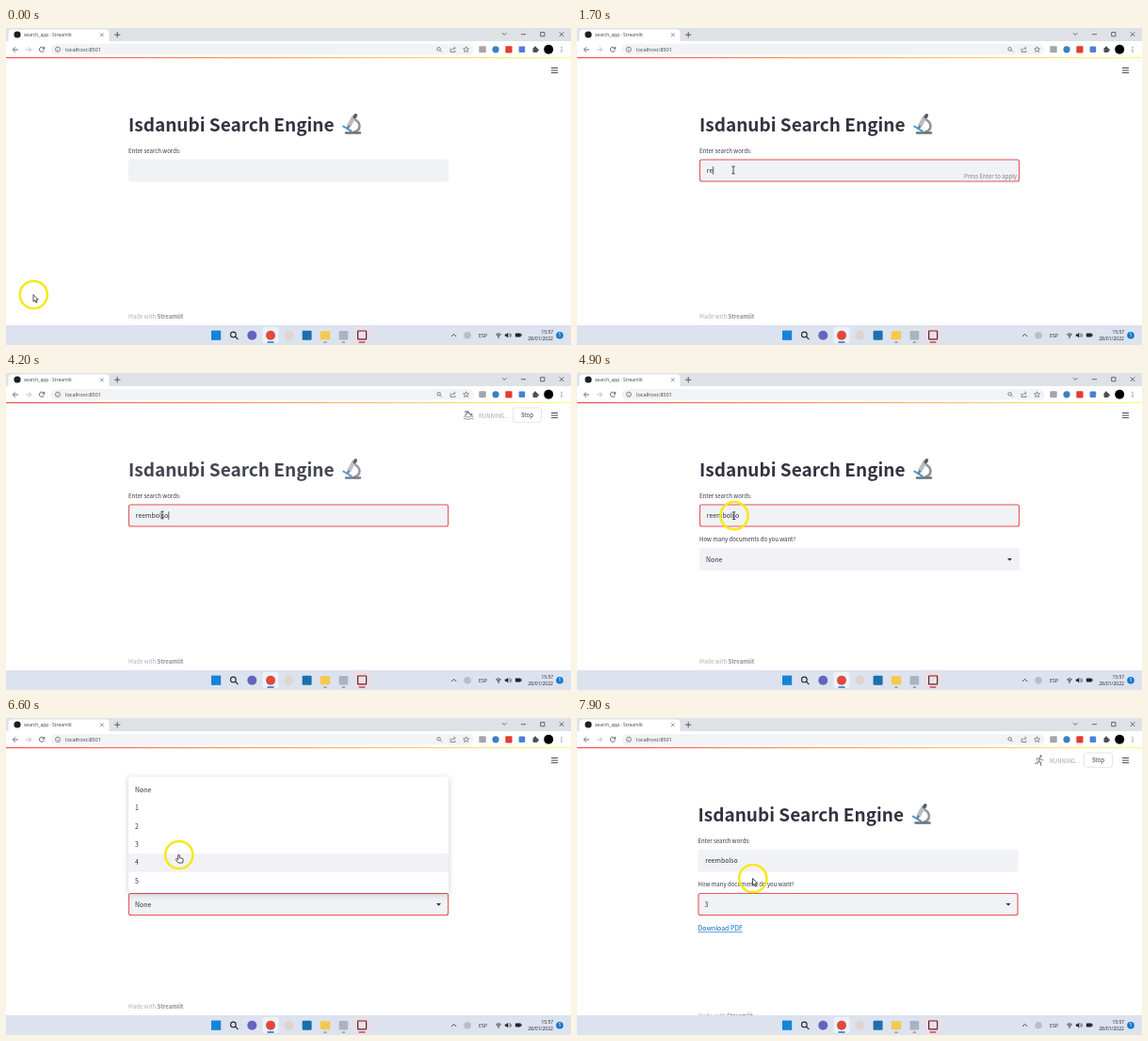
An HTML page with a canvas for the animation above (8 s loop, 600 px wide and 337 px high).

```html
<!DOCTYPE html>
<html lang="en">
<head>
<meta charset="utf-8">
<title>search_app</title>
<style>
html, body { margin: 0; width: 100%; height: 100%; overflow: hidden; background: #fff; }
canvas { display: block; width: 600px; height: 337px; }
</style>
</head>
<body>
<canvas id="stage"></canvas>
<script>
const W = 600, H = 337, LOOP = 8000;
const canvas = document.getElementById('stage');
const c = canvas.getContext('2d');
const dpr = window.devicePixelRatio || 1;
canvas.width = W * dpr;
canvas.height = H * dpr;

const PAGE_FONT = '"Noto Sans CJK JP", "Noto Sans CJK SC", "Noto Sans CJK", sans-serif';
const UI_FONT = '"Open Sans", "Noto Sans", sans-serif';
const INK = '#31333f', RED = '#ec5555', FIELD = '#f0f2f6';
const SMALL = 6.05, BODY = 6.92;

const WORD = 'reembolso';
const KEYS = [1400, 1600, 1900, 2000, 2200, 2400, 2600, 2800, 3000];
const FOCUS = 900, ENTER = 3400, SELECT_IN = 4500;
const OPEN = 5800, PICK = 7000, LINK_IN = 7500;
const ROW_TOP = 66.6, ROW_H = 19.4;

// time, x, y of the pointer tip
const PATH = [
  [0, 29, 283.5], [150, 29, 283.5], [900, 166, 151], [4850, 166, 151],
  [5450, 198.5, 184.5], [5550, 198.5, 184.5], [5750, 197, 198], [6000, 197, 198],
  [6550, 183.5, 145.5], [6650, 183.5, 145.5], [6880, 184, 135], [7050, 184, 135],
  [7700, 186.5, 170.5], [8000, 186.5, 170.5]
];

const clamp = v => Math.max(0, Math.min(1, v));
const ramp = (t, a, b) => clamp((t - a) / (b - a));

function pointer(t) {
  let i = 1;
  while (i < PATH.length - 1 && PATH[i][0] < t) i++;
  const a = PATH[i - 1], b = PATH[i];
  const u = ramp(t, a[0], b[0]), e = u * u * (3 - 2 * u);
  return { x: a[1] + (b[1] - a[1]) * e, y: a[2] + (b[2] - a[2]) * e };
}

function text(str, x, y, size, color = INK, opt = {}) {
  c.font = `${opt.bold ? 'bold ' : ''}${size}px ${opt.font || PAGE_FONT}`;
  c.textAlign = opt.align || 'left';
  c.fillStyle = color;
  c.fillText(str, x, y);
  return c.measureText(str).width;
}

function rect(x, y, w, h, color) {
  c.fillStyle = color;
  c.fillRect(x, y, w, h);
}

function round(x, y, w, h, r, fill, stroke, lw = 1) {
  c.beginPath();
  c.roundRect(x, y, w, h, r);
  if (fill) { c.fillStyle = fill; c.fill(); }
  if (stroke) { c.strokeStyle = stroke; c.lineWidth = lw; c.stroke(); }
}

function disc(x, y, r, fill) {
  c.beginPath();
  c.arc(x, y, r, 0, 7);
  c.fillStyle = fill;
  c.fill();
}

function ring(x, y, r, color, lw, from = 0, to = Math.PI * 2) {
  c.beginPath();
  c.arc(x, y, r, from, to);
  c.strokeStyle = color;
  c.lineWidth = lw;
  c.stroke();
}

// polylines given as an SVG path
function line(d, color, lw = 0.8) {
  c.strokeStyle = color;
  c.lineWidth = lw;
  c.stroke(new Path2D(d));
}

function shape(d, color) {
  c.fillStyle = color;
  c.fill(new Path2D(d));
}

function magnifier(x, y, s, color, lw) {
  ring(x - s * 0.15, y - s * 0.15, s * 0.65, color, lw);
  line(`M${x + s * 0.3} ${y + s * 0.3}L${x + s} ${y + s}`, color, lw);
}

function drawBrowser() {
  const ico = '#5f6368';
  rect(0, 0, W, 14, '#dee1e6');
  round(2.5, 1.5, 107, 14, [4, 4, 0, 0], '#fff');
  rect(0, 14, W, 17, '#fff');
  disc(12, 7, 3.6, '#1d1d24');
  text('search_app · Streamlit', 19, 9, 4.94, '#3c4043', { font: UI_FONT });
  line('M100 5.5l3.6 3.6m0 -3.6l-3.6 3.6', ico, 0.7);
  line('M115 7.2h6.4m-3.2 -3.2v6.4', '#3c4043', 0.8);
  line('M527 5.2l2.2 2.2l2.2 -2.2', '#333', 0.7);
  line('M547 6.7h5', '#333', 0.7);
  line('M567.7 4.6h4.2v4.2h-4.2z', '#333', 0.7);
  line('M587.7 4.4l4.6 4.6m0 -4.6l-4.6 4.6', '#333', 0.7);

  line('M13 23h-5.6m2.6 -2.7l-2.7 2.7l2.7 2.7', ico, 0.9);
  line('M21 23h5.6m-2.6 -2.7l2.7 2.7l-2.7 2.7', '#b5b8bc', 0.9);
  ring(38, 22.8, 2.6, ico, 0.9, 0.3, 5.4);
  shape('M41.2 19.6v3h-3z', ico);
  round(47.5, 17, 449, 11.6, 5.8, '#f1f3f4');
  ring(55, 22.8, 2.6, ico, 0.7);
  line('M55 22.4v1.8m0 -3v-.7', ico, 0.7);
  text('localhost:8501', 63, 24.9, 5.65, '#3c4043', { font: UI_FONT });
  magnifier(460, 22.7, 2.7, ico, 0.8);
  line('M472 21.5v4h5v-1.5m-3.5 -.3q.3 -2.2 3 -2.3m-1 -1.6l1.7 1.6l-1.7 1.6', ico, 0.7);
  c.beginPath();
  for (let i = 0; i < 10; i++) {
    const a = -Math.PI / 2 + i * Math.PI / 5, r = i % 2 ? 1.4 : 3.2;
    c.lineTo(488.6 + r * Math.cos(a), 23 + r * Math.sin(a));
  }
  c.closePath();
  c.strokeStyle = ico;
  c.lineWidth = 0.7;
  c.stroke();
  round(502.3, 19.3, 7.4, 7, 1, '#a3a5aa');
  disc(520, 22.8, 3.6, '#3b7fc4');
  round(530.3, 19.2, 7.2, 7.2, 1, '#e53b30');
  round(544.6, 19.5, 6.6, 6.6, 1, '#4a80d6');
  round(559.5, 21, 5, 5, 0.8, '#4c4f54');
  disc(562, 20.7, 1.2, '#4c4f54');
  disc(564.7, 23.4, 1.2, '#4c4f54');
  disc(576.2, 22.8, 5, '#000');
  for (let i = -1; i < 2; i++) disc(590, 22.8 + i * 2.2, 0.65, ico);
}

function drawTaskbar() {
  rect(0, 316, W, 21, '#dce3ee');
  round(272.5, 318, 17, 17, 2, '#edf1f8');
  round(369.5, 318, 17, 17, 2, '#f1dce2');
  rect(218, 321.6, 10.2, 10.2, '#1583d8');
  magnifier(242, 326.6, 4.4, '#25282e', 1.1);
  disc(261.3, 326.7, 5, '#6264c0');
  disc(281, 326.7, 5, '#e2483c');
  disc(300.2, 326.7, 5, '#ded4d0');
  round(314.6, 321.8, 10, 10, 1.2, '#1b6fae');
  round(333.8, 322.2, 10.4, 9, 1, '#f4c94c');
  round(353.6, 322, 9.6, 9.6, 1.2, '#aab3bf');
  round(373.6, 322, 9, 8.8, 0.4, null, '#4b2a35', 1.2);
  round(277.3, 333.3, 7.4, 1.4, 0.7, '#1a73c4');
  round(337.2, 333.5, 3.6, 1.2, 0.6, '#85898f');
  round(356.6, 333.5, 3.6, 1.2, 0.6, '#85898f');
  round(374.5, 333.3, 7, 1.4, 0.7, '#d2434d');

  const ink = '#22252a', ui = { font: UI_FONT };
  line('M473 328l2.6 -2.6l2.6 2.6', ink, 0.8);
  disc(490, 326.7, 3.8, '#b9bec6');
  text('ESP', 502, 328.8, 5.2, ink, ui);
  for (let r = 1.6; r < 5; r += 1.4) ring(523, 329.2, r, ink, 0.7, -2.3, -0.84);
  disc(523, 329, 0.7, ink);
  shape('M529.8 325.6h1.5l2 -1.8v5.8l-2 -1.8h-1.5z', ink);
  ring(533.4, 326.7, 1.7, ink, 0.6, -0.9, 0.9);
  ring(533.4, 326.7, 3, ink, 0.6, -0.9, 0.9);
  round(540.8, 324.6, 6, 3.8, 0.8, ink);
  rect(547, 325.7, 0.8, 1.6, ink);
  text('15:57', 581, 325, 4.9, ink, { font: UI_FONT, align: 'right' });
  text('28/01/2022', 581, 332.4, 5.05, ink, { font: UI_FONT, align: 'right' });
  disc(588, 326.7, 3.8, '#1277c9');
  text('5', 588, 328.4, 4.4, '#fff', { font: UI_FONT, align: 'center' });
}

function drawMicroscope(x) {
  c.save();
  c.translate(x, 0);
  c.lineCap = 'round';
  line('M241 97.5q6 4 4 9q-1 3 -5 4', '#8e949b', 2.6);
  line('M231 111.5h15', '#6a7078', 2.4);
  line('M228.3 104.5l8.4 5.2', '#3f94dc', 2);
  line('M239 95l-4.6 8.6', '#b7bcc2', 4.4);
  line('M241.3 92.8l-1 1.9', '#555b63', 3.6);
  line('M233.9 104.6l-.9 1.6', '#7a8088', 2.4);
  c.restore();
}

function drawSport(swim) {
  const g = '#85868d';
  c.lineCap = c.lineJoin = 'round';
  if (swim) {
    disc(494.2, 44.2, 1.3, g);
    line('M487.5 41.2l3.2 -.2l2 2.6m-2.2 -2.2l-2.6 3.2', g, 1.3);
    line('M486.4 46.4q1.6 -1.2 3.2 0t3.2 0t3.4 0M486.4 48.8q1.6 -1.2 3.2 0t3.2 0t3.4 0', g, 0.9);
  } else {
    disc(492.6, 40.6, 1.3, g);
    line('M491.6 42.8l-1.4 3.2l2.4 1.4l-.2 2.9m-2.4 -3.8l-1 1.6l-2.4 .1', g, 1.3);
    line('M488 45l.5 -2.1l3 -.3l1.5 1.9l2 .2', g, 1);
  }
  c.lineCap = 'butt';
  c.lineJoin = 'miter';
}

function drawStatus(t) {
  const first = ramp(t, 3450, 3800) * (1 - ramp(t, SELECT_IN, SELECT_IN + 150));
  const second = ramp(t, 7150, 7450);
  const alpha = Math.max(first, second);
  if (!alpha) return;
  const step = Math.floor((t - (second ? 7100 : 3500)) / 300);
  c.globalAlpha = alpha;
  drawSport((step % 2 === 0) !== (second > 0));
  text('RUNNING...', 502, 47.7, SMALL, 'rgba(49,51,63,.45)');
  round(538.5, 37, 30, 15.3, 2, '#fff', '#dcdce0', 0.7);
  text('Stop', 553.4, 47, SMALL, INK, { align: 'center' });
  c.globalAlpha = 1;
}

function drawField(x, y, focused) {
  round(x, y, 340, 24, 2, FIELD);
  if (focused) round(x + 0.5, y + 0.5, 339, 23, 2, null, RED, 1.1);
}

function drawInput(x, t) {
  const focused = t >= FOCUS && t < OPEN;
  const typed = KEYS.filter(k => t >= k).length;
  drawField(x, 139.5, focused);
  const w = text(WORD.slice(0, typed), x + 7.8, 154, BODY);
  if (!focused) return;
  const last = typed ? KEYS[typed - 1] : FOCUS;
  if ((t - last) % 1060 < 530) rect(x + 8 + w, 147.2, 0.7, 8.6, '#222');
  if (typed && t < ENTER) {
    text('Press Enter to apply', x + 337, 160, SMALL, 'rgba(49,51,63,.6)', { align: 'right' });
  }
}

function drawSelect(x, t) {
  const alpha = ramp(t, SELECT_IN, SELECT_IN + 150);
  if (!alpha) return;
  c.globalAlpha = alpha;
  text('How many documents do you want?', x, 179, SMALL);
  drawField(x, 186, t >= OPEN);
  text(t >= PICK ? '3' : 'None', x + 7, 200.5, BODY);
  const ax = x + 327;
  shape(`M${ax} 197h5l-2.5 2.8z`, INK);
  c.globalAlpha = 1;
}

function drawMenu(p) {
  c.save();
  c.shadowColor = 'rgba(0,0,0,.2)';
  c.shadowBlur = 6 * dpr;
  c.shadowOffsetY = 1.5 * dpr;
  round(130, 62.5, 340, 123.5, 2, '#fff');
  c.restore();
  const row = Math.floor((p.y - ROW_TOP) / ROW_H);
  const hot = row >= 0 && row < 6 ? row : 0;
  rect(130, ROW_TOP + hot * ROW_H, 340, ROW_H, FIELD);
  ['None', '1', '2', '3', '4', '5'].forEach((s, i) =>
    text(s, 137, ROW_TOP + i * ROW_H + 12.2, BODY));
}

function drawPage(t, p) {
  const moved = t >= LINK_IN;
  const x = moved ? 128.5 : 130;
  rect(0, 31, W, 285, '#fff');
  const g = c.createLinearGradient(0, 0, W, 0);
  g.addColorStop(0, '#ff4b4b');
  g.addColorStop(1, '#fffd80');
  rect(0, 31, W, 1.2, g);
  for (let i = 0; i < 3; i++) rect(579, 42 + i * 2.6, 7, 0.9, INK);
  drawStatus(t);

  // content dims slowly while the script is running
  const late = t < SELECT_IN ? ramp(t, 3900, 4900) : 0;
  c.globalAlpha = 1 - 0.67 * Math.pow(late, 1.7);
  text('Isdanubi Search Engine', x, 109.6, 19.03, INK, { bold: true });
  drawMicroscope(x);
  c.globalAlpha = 1;
  text('Enter search words:', x, 132.6, SMALL);
  drawInput(x, t);
  drawSelect(x, t);
  if (moved) {
    const w = text('Download PDF', x, 226.3, BODY, '#0068c9');
    rect(x, 227.2, w, 0.6, '#0068c9');
  }
  const footY = moved ? 318.7 : 309;
  const w = text('Made with ', x, footY, SMALL, 'rgba(49,51,63,.4)');
  text('Streamlit', x + w, footY, SMALL, 'rgba(49,51,63,.55)', { bold: true });
  if (t >= OPEN && t < PICK) drawMenu(p);
}

function drawPointer(t, p) {
  const { x, y } = p;
  const beam = t < 5500 && y > 139 && y < 164;
  const hand = t >= 5750 && t < 7250;
  if (t < 950 || t > 4850) ring(x + 0.3, y, 14.6, '#f6e81c', 2.5);
  if (beam) {
    line(`M${x - 1.6} ${y - 3.8}h3.2M${x} ${y - 3.8}v7.6M${x - 1.6} ${y + 3.8}h3.2`, '#222', 0.8);
    return;
  }
  c.save();
  c.translate(x, y);
  c.lineJoin = 'round';
  const d = hand
    ? 'M-.8 .2q.8 -.9 1.6 0v3l3 .6q1 .3 .9 1.4l-.6 3.3h-4.6l-2.6 -3.4q0 -1.3 1.3 -.8l1 .8z'
    : 'M0 0v7.4l1.7 -1.5l1.2 2.6l1.2 -.5l-1.2 -2.6h2.4z';
  shape(d, '#fff');
  line(d, '#222', 0.8);
  c.restore();
}

function frame() {
  const t = performance.now() % LOOP;
  const p = pointer(t);
  c.setTransform(dpr, 0, 0, dpr, 0, 0);
  drawPage(t, p);
  drawBrowser();
  drawTaskbar();
  drawPointer(t, p);
  requestAnimationFrame(frame);
}
frame();
</script>
</body>
</html>
```
